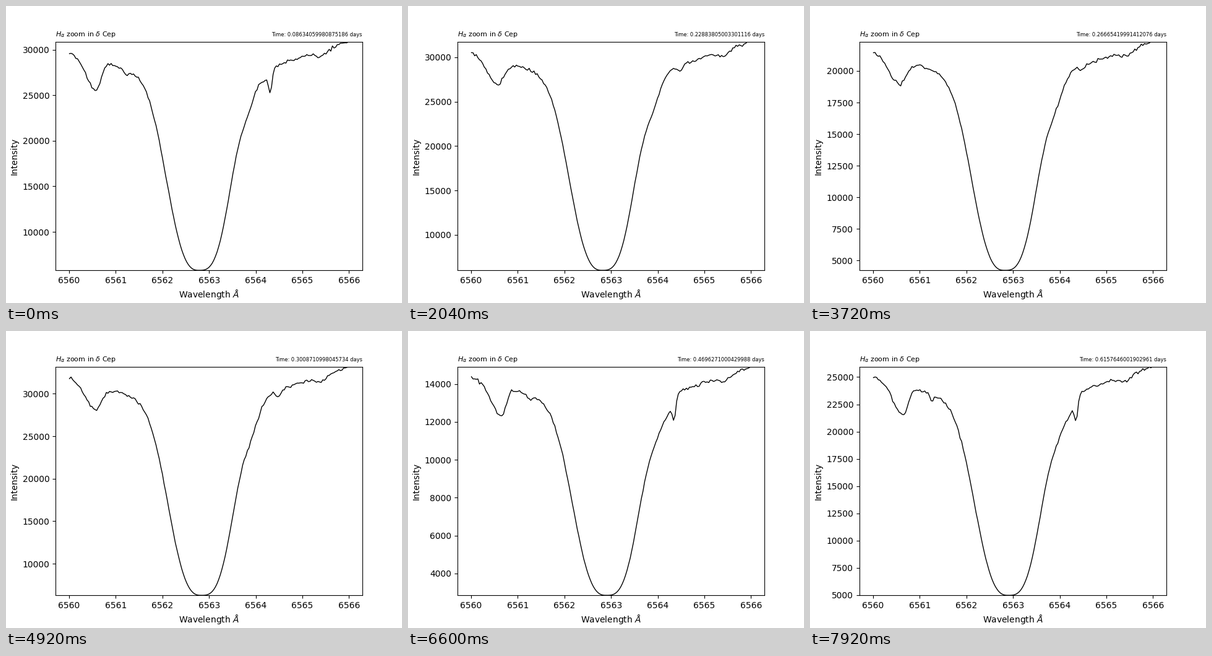
These frames come from a looping animation (640 by 480 pixels, 8000 ms). A matplotlib script:

```python
import numpy as np
import matplotlib.pyplot as plt
from matplotlib.animation import FuncAnimation

STEPS = 67          # spectra per loop, 120 ms each, the last one 80 ms
TICK = 40           # ms

# Observation time and peak intensity at a few spectra
TIMES = {0: 0.08634059980875186, 11: 0.20838710013129624,
         23: 0.24928899993472609, 31: 0.26665419991412076,
         41: 0.3008710998045734, 55: 0.4696271000429988,
         66: 0.6157646001902961}
PEAKS = {0: 30876, 11: 36432, 23: 27105, 31: 22320, 41: 33182,
         49: 9000, 55: 14911, 63: 9000, 66: 25959}

wave = np.linspace(0.0075, 5.9875, 175)     # offset from 6560 angstrom


def at(k, points):
    return np.interp(k, list(points), list(points.values()))


def dip(centre, depth, left, right=None):
    """Narrow absorption line, optionally with a different right half."""
    d = wave - centre
    sigma = np.where(d < 0, left, right or left)
    return depth * np.exp(-0.5 * (d / sigma) ** 2)


def spectrum(k):
    """Flux of spectrum k, from 0 in the line core to 1 at the right end."""
    phase = np.clip((at(k, TIMES) - 0.086) / 0.384, 0, 1)
    sharp = np.interp(k, [0, 11, 41, 55], [1, 0, 0, 1])
    centre = 2.783 + 0.114 * phase ** 1.5
    width = 0.99 + 0.035 * phase
    drift = 0.035 * phase

    # Flat-bottomed core in a continuum that rises to both sides
    d = (wave - centre) / width
    core = np.where(d < 0, (abs(d) / 0.821) ** 2.7, (abs(d) / 0.811) ** 3.1)
    continuum = np.interp(wave, [0, centre, 5.985], [0.956, 0.78, 1])
    flux = continuum * (1 - np.exp(-core))

    flux -= dip(centre + 1.08 * width, 0.09, 0.17)
    flux -= dip(0.554 + (0.018 + 0.075 * phase) * sharp,
                0.108 + 0.025 * sharp, 0.21, 0.146 - 0.045 * sharp)
    flux -= dip(1.22 + drift, 0.023 * sharp, 0.046)
    flux -= dip(4.17 + drift, 0.031 * sharp, 0.06)
    flux -= dip(4.315 + drift, 0.1 * sharp, 0.045, 0.038)
    flux -= dip(4.48, 0.022 * (1 - sharp), 0.05)
    flux -= dip(5.42, 0.024, 0.12)

    noise = np.random.default_rng(100 + k).normal(0, 0.004, wave.size)
    return np.clip(flux + noise * flux, 0, 1)


fig, ax = plt.subplots(figsize=(6.4, 4.8), dpi=100)
curve, = ax.plot(6560 + wave, spectrum(0), color="black", lw=1)
ax.set_xlabel(r"Wavelength $\AA$")
ax.set_ylabel("Intensity")
ax.set_title(r"$H_\alpha$ zoom in $\delta$ Cep", loc="left", fontsize=8)
clock = ax.set_title("", loc="right", fontsize=6)


def update(i):
    k = min(i * TICK // 120, STEPS - 1)
    t = at(k, TIMES)
    high = at(k, PEAKS)
    low = high * (0.1865 + 0.009 * t)
    curve.set_ydata(low + (high - low) * spectrum(k))
    ax.set_ylim(low, high)
    digits = 17 if t < 0.28 else 16
    clock.set_text(f"Time: {t:.{digits}f} days")
    return curve, clock


anim = FuncAnimation(fig, update, frames=200, interval=TICK,
                     repeat=True, repeat_delay=0, blit=False)
plt.show()
```
